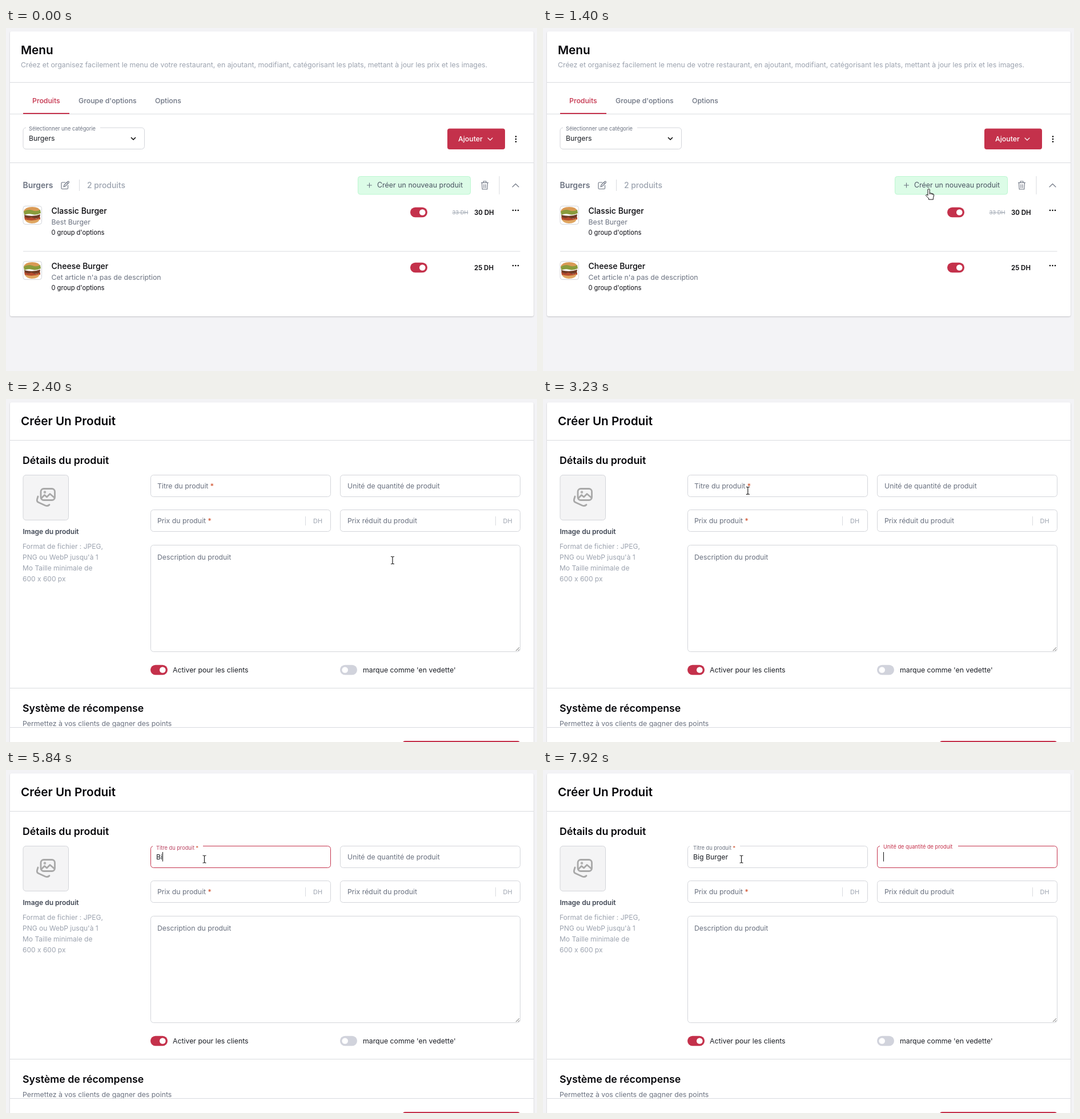
Animation, 930 px wide and 602 px high, one loop 8000 ms. Source, as an HTML page:

```html
<!DOCTYPE html>
<html lang="fr">
<head>
<meta charset="utf-8">
<title>Menu</title>
<style>
html, body { margin: 0; width: 100%; height: 100%; overflow: hidden; background: #f3f3f6; }
svg { display: block; }
text { font: 400 12.3px Inter, "Open Sans", sans-serif; font-optical-sizing: none; fill: #6b7280; white-space: pre; }
.h1 { font-size: 20.7px; font-weight: 600; fill: #050509; }
.h2 { font-size: 17.75px; font-weight: 600; fill: #050509; }
.cat { font-size: 13.9px; font-weight: 600; }
.name { font-size: 14px; font-weight: 500; fill: #050509; }
.tab { font-weight: 500; }
.small { font-size: 9.2px; }
.hint { font-size: 12px; fill: #9ca3af; }
.group { font-size: 11.1px; fill: #0b0b12; }
.price { font-size: 11.5px; font-weight: 600; fill: #050509; }
.old { font-size: 9.4px; fill: #9ca3af; text-decoration: line-through; }
.unit { font-size: 11px; fill: #9ca3af; }
.pale { fill: #9ca3af; }
.dark { fill: #1d2027; }
.red { fill: #c4314b; }
.star { fill: #cf4a24; }
.white { fill: #fff; }
.line { stroke: #d9dbdf; fill: none; }
.field { stroke: #d3d5da; fill: #fff; }
.icon { stroke: #6b7280; fill: none; stroke-width: 1.1; stroke-linecap: round; stroke-linejoin: round; }
.card { fill: #fff; filter: drop-shadow(0 1px 1px #0003); }
#cursor path { fill: #fff; stroke: #111; stroke-linejoin: round; }
#cursor #beam { fill: none; stroke: #222; stroke-width: 1.2; }
</style>
</head>
<body>
<svg width="930" height="602" viewBox="0 0 930 602">
  <defs>
    <g id="toggle"><rect y="-.3" width="30" height="17.600" rx="8.800"/><circle class="white" cx="21.300" cy="8.500" r="5.300"/></g>
    <g id="dots"><circle r="1.250"/><circle cx="4.500" r="1.250"/><circle cx="9" r="1.250"/></g>
    <g id="burger">
      <rect class="field" x="30" y="312.500" width="32.500" height="32" rx="4"/>
      <path d="M31 322Q33 314 46 314Q58 314 60 321L59 325H32Z" fill="#d99a55"/>
      <path d="M31 322q8-5 15-2t14-1l1 6q-8 4-15 2t-14 1z" fill="#899b3c"/>
      <path d="M32 328q15 4 28-1l-1 6q-13 4-26 1z" fill="#713b26"/>
      <path d="M32 331q7 5 12 1l8 3 8-3v4q-13 4-27 1z" fill="#b64a2d"/>
      <path d="M33 336q13 4 26-1-2 8-14 8-10-1-12-7z" fill="#dfa661"/>
    </g>
  </defs>

  <g id="list">
    <rect class="card" x="7" y="6" width="917" height="500" rx="3"/>
    <path class="line" d="M7 95.500H924M7 151H924M7 236.500H924M30 392H900.500M128.500 266V286M864 260V292"/>
    <text class="h1" x="26" y="46">Menu</text>
    <text class="pale" x="26" y="69">Créez et organisez facilement le menu de votre restaurant, en ajoutant, modifiant, catégorisant les plats, mettant à jour les prix et les images.</text>
    <text class="tab red" x="46" y="131.500">Produits</text>
    <text class="tab" x="127" y="131.500">Groupe d'options</text>
    <text class="tab" x="261" y="131.500">Options</text>
    <rect class="red" x="30" y="149" width="81" height="2"/>

    <rect class="field" x="30" y="175" width="212.500" height="37.500" rx="5"/>
    <rect class="white" x="35" y="174" width="130" height="2"/>
    <text class="small" x="40" y="179.500">Sélectionner une catégorie</text>
    <text class="dark" x="40" y="198">Burgers</text>
    <path class="icon" d="M219.500 192.500l3.500 3.500 3.500-3.500" style="stroke:#111;stroke-width:1.700"/>
    <rect class="red" x="773" y="176.500" width="101" height="36.500" rx="4"/>
    <text class="tab white" x="792" y="199">Ajouter</text>
    <path class="icon" d="M844 193l4 4 4-4" style="stroke:#fff"/>
    <use href="#dots" transform="translate(893 190.500) rotate(90)"/>

    <text class="cat" x="29.500" y="280.500">Burgers</text>
    <path class="icon" d="M104 271h-5.500q-1.500 0-1.500 1.500v8.500q0 1.500 1.500 1.500h8.500q1.500 0 1.500-1.500V276M101 279l1-3.500 6-6q1-1 2 0t0 2l-6 6zM106.500 271l2 2"/>
    <text class="cat pale" x="142" y="280.500" style="font-weight:500">2 produits</text>
    <rect x="616.500" y="260.500" width="197" height="31.500" rx="4" fill="#dcfce7" stroke="#bbf7d0"/>
    <path class="icon" d="M632.500 276h8M636.500 272v8"/>
    <text x="650" y="280.300" style="font-size:12.450px;fill:#4b5563">Créer un nouveau produit</text>
    <path class="icon" d="M832.500 271.500h12M836 271v-2h5v2M833.500 272l.7 11h8.600l.7-11M837 274.500v6M840 274.500v6"/>
    <path class="icon" d="M887 279l5.500-5.500 5.500 5.500"/>

    <use href="#burger"/>
    <text class="name" x="79.500" y="326">Classic Burger</text>
    <text x="79.500" y="344.500">Best Burger</text>
    <text class="group" x="79.500" y="362.500">0 group d'options</text>
    <use class="red" href="#toggle" x="708" y="315"/>
    <text class="old" x="781.500" y="327">33 DH</text>
    <text class="price" x="820" y="327.500">30 DH</text>
    <use href="#dots" x="888" y="320"/>

    <use href="#burger" y="97"/>
    <text class="name" x="79.500" y="423">Cheese Burger</text>
    <text x="79.500" y="441.500">Cet article n'a pas de description</text>
    <text class="group" x="79.500" y="459.500">0 group d'options</text>
    <use class="red" href="#toggle" x="708" y="412"/>
    <text class="price" x="820" y="424.500">25 DH</text>
    <use href="#dots" x="888" y="417"/>
  </g>

  <g id="form">
    <g id="page">
      <rect class="card" x="7" y="6" width="917" height="660" rx="3"/>
      <path class="line" d="M7 72.500H924M7 507.500H924"/>
      <text class="h1" x="26" y="45.500">Créer Un Produit</text>
      <text class="h2" x="29" y="113.500">Détails du produit</text>

      <rect x="30" y="133.500" width="79.500" height="79" rx="5" fill="#f4f4f5" stroke="#d3d5da"/>
      <g fill="none" stroke="#a8a8a8" stroke-width="2.800" stroke-linecap="round" stroke-linejoin="round">
        <rect x="61" y="157.500" width="24.500" height="20" rx="5"/>
        <path d="M62 174l5.500-5.500 4 3.500 5.500-5.500 7.500 6.500M56 171l-1.500 5q-1 4 2.500 5.500l12 5.500q4.500 1.500 7-1.500"/>
        <circle cx="68" cy="163.500" r=".8"/>
      </g>
      <text x="29.500" y="237" style="font-size:12px;font-weight:600;fill:#414855">Image du produit</text>
      <text class="hint" x="29" y="263">Format de fichier : JPEG,</text>
      <text class="hint" x="29" y="282">PNG ou WebP jusqu'à 1</text>
      <text class="hint" x="29" y="301">Mo Taille minimale de</text>
      <text class="hint" x="29" y="319.500">600 x 600 px</text>

      <rect class="field" id="box1" x="253.500" y="133.500" width="315" height="38" rx="5"/>
      <rect class="field" id="box2" x="585.500" y="133.500" width="315" height="38" rx="5"/>
      <rect class="white" id="gap1" x="257" y="132.500" width="88" height="2"/>
      <rect class="white" id="gap2" x="590" y="132.500" width="137" height="2"/>
      <text id="label1">Titre du produit <tspan class="star">*</tspan></text>
      <text id="label2">Unité de quantité de produit</text>
      <text class="dark" id="typed" x="263" y="156.500"></text>
      <rect id="caret" y="144" width="1" height="16.500" fill="#111"/>

      <rect class="field" x="253.500" y="194.500" width="315" height="38" rx="5"/>
      <rect class="field" x="585.500" y="194.500" width="315" height="38" rx="5"/>
      <path class="line" d="M524.500 206V222M857.500 206V222"/>
      <text x="265" y="218">Prix du produit <tspan class="star">*</tspan></text>
      <text x="598" y="218">Prix réduit du produit</text>
      <text class="unit" x="538" y="218">DH</text>
      <text class="unit" x="870.500" y="218">DH</text>

      <rect class="field" x="253.500" y="256.500" width="647" height="187" rx="5"/>
      <text x="265" y="282">Description du produit</text>
      <path d="M893 442l6-6M896.500 442l2.500-2.500" stroke="#555" stroke-width=".9"/>

      <use class="red" href="#toggle" x="253" y="467"/>
      <text class="dark" x="292" y="480">Activer pour les clients</text>
      <rect x="585" y="466.700" width="30" height="17.600" rx="8.800" fill="#d1d3dc"/>
      <circle class="white" cx="593.700" cy="475.500" r="5.300"/>
      <text class="dark" x="625" y="480">marque comme 'en vedette'</text>

      <text class="h2" x="29" y="549">Système de récompense</text>
      <text x="29" y="574">Permettez à vos clients de gagner des points</text>
      <rect class="field" x="30" y="595" width="239" height="37.500" rx="5"/>
    </g>
    <rect class="white" x="7" y="576" width="917" height="26"/>
    <path class="line" d="M7 576.500H924"/>
    <rect class="red" x="695" y="600" width="205" height="37" rx="4"/>
  </g>

  <g id="cursor">
    <path id="arrow" d="M0 0V14L3.300 11 5.500 16 7.800 15 5.600 10.200H9.500Z"/>
    <path id="hand" d="M-2 10V1a1.600 1.600 0 0 1 3.200 0V6.500l5.800 1.500q2 .6 1.600 3l-1.200 4.500V18H-.5v-2L-5 11.500q-1-1.600.6-2T-2 11zM1.200 6.500V9M4 7.200V9.500M6.500 8v2"/>
    <path id="beam" d="M-3-6.500Q0-6.500 0-5.500Q0-6.500 3-6.500M0-5.500V5.500M-3 6.500Q0 6.500 0 5.500Q0 6.500 3 6.500"/>
  </g>
</svg>
<script>
const $ = id => document.getElementById(id);
const LOOP = 8000, OPEN = 2060, FOCUS = 3400, NEXT = 7670;
const word = 'Big Burger';
// time at which each character of the word appears
const keys = [5590, 5840, 5950, 6090, 6420, 6750, 7000, 7080, 7080, 7250];
const blinks = [FOCUS, 3830, 4330, 4910, 5410];
const accent = '#c4314b';

const mix = (a, b, p) => a + (b - a) * p;
const easeOut = p => 1 - (1 - p) ** 2;
const smooth = p => p * p * (3 - 2 * p);
const show = (id, on) => $(id).style.display = on ? '' : 'none';

// progress in n jumps: 1/n at time a, 1 at time b
function steps(t, a, b, n) {
  const k = Math.floor((t - a) / (b - a) * (n - 1) + 1e-6) + 1;
  return Math.max(0, Math.min(1, k / n));
}

function placeLabel(id, p, from, to, color) {
  const x = mix(from[0], to[0], p), y = mix(from[1], to[1], p);
  $(id).setAttribute('transform', `translate(${x} ${y}) scale(${mix(1, .75, p)})`);
  $(id).style.fill = color;
}

function placeCursor(t) {
  let x, y, shape = 'arrow';
  if (t < OPEN) {
    const p = easeOut(steps(t, 240, 980, 10));
    x = mix(806, 676, p);
    y = mix(610, 331, p) - 48 * easeOut(steps(t, 1060, 1400, 5));
    if (y < 480) shape = 'hand';
  } else if (t < 2240) {
    x = 675.5;
    y = 282.5;
  } else {
    const p = smooth(steps(t, 2650, 3300, 9));
    x = mix(677, 347.5, p);
    y = mix(283, 156.5, p);
    const overField = y > 256 || y > 195 && y < 233 || y < 171;
    if (overField) shape = 'beam';
  }
  $('cursor').setAttribute('transform', `translate(${x} ${y})`);
  for (const s of ['arrow', 'hand', 'beam']) show(s, s === shape);
  show('cursor', t >= 240);
}

function draw(t) {
  show('list', t < OPEN);
  show('form', t >= OPEN);
  $('page').setAttribute('transform', `translate(0 ${t < 2400 ? -26.5 : 0})`);

  const first = t >= FOCUS && t < NEXT, second = t >= NEXT;
  $('box1').style.stroke = first ? accent : '';
  $('box2').style.stroke = second ? accent : '';
  show('gap1', t >= FOCUS);
  show('gap2', second);
  placeLabel('label1', steps(t, FOCUS, 3580, 3), [265, 156.5], [263, 139.5], first ? '#b9405f' : '');
  placeLabel('label2', steps(t, NEXT, 7920, 4), [598, 156.5], [596, 138], second ? accent : '');

  $('typed').textContent = word.slice(0, keys.filter(k => t >= k).length);
  const end = $('typed').textContent ? $('typed').getComputedTextLength() : 0;
  $('caret').setAttribute('x', second ? 596 : Math.round(263 + end));
  show('caret', blinks.filter(b => t >= b).length % 2);

  placeCursor(t);
}

function frame() {
  draw(performance.now() % LOOP);
  requestAnimationFrame(frame);
}
frame();
</script>
</body>
</html>
```
